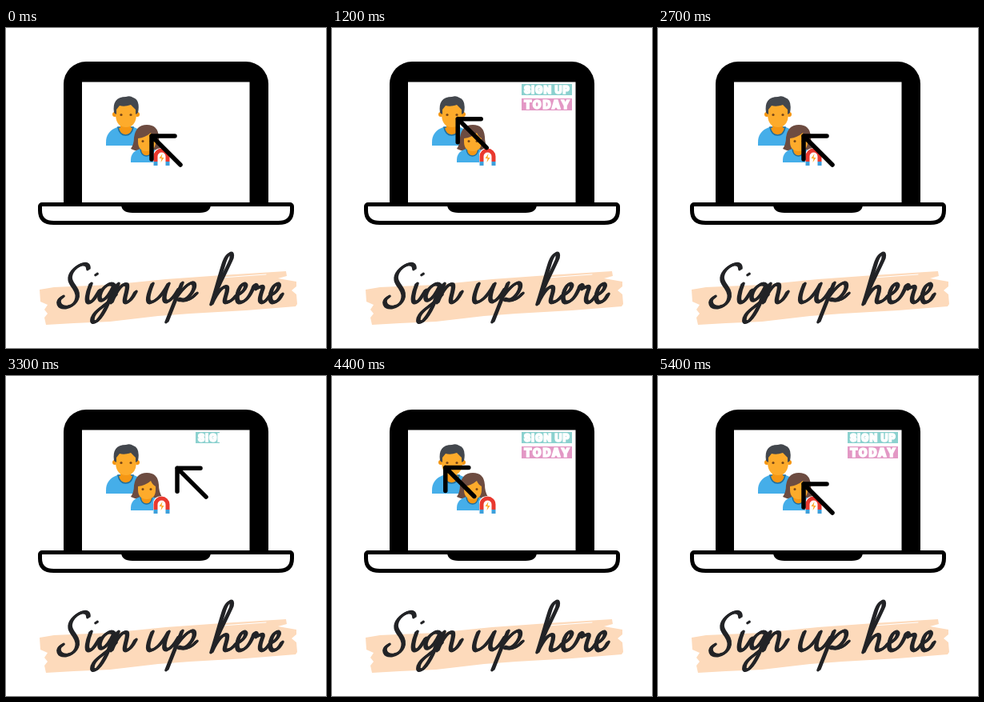
Animation, 400 px wide and 400 px high, one loop 5.5 s. Source, as an HTML page:

```html
<!DOCTYPE html>
<html lang="en">
<head>
<meta charset="utf-8">
<title>Sign up here</title>
<style>
  html, body { margin: 0; width: 100%; height: 100%; overflow: hidden; background: #fff; }
  svg { display: block; }
  #stage { width: 100vw; height: 100vh; }
  .label { font: 900 12.500px Inter, sans-serif; fill: #fff; stroke: #fff; stroke-width: 1.4; }
  .line { fill: none; stroke-linecap: round; stroke-linejoin: round; }
</style>
</head>
<body>
<svg id="stage" viewBox="0 0 400 400">
  <!-- brush stroke -->
  <path fill="#fddabb" d="M42 327 L60 324 130 321 200 314 270 309 350 304 351 310 340 313 363 317 363 323 357 328 363 333 364 345 362 348 300 353 230 357 190 360 130 367 85 369 50 371 48 362 52 357 48 352 52 346 43 342Z"/>
  <path class="line" stroke="#fff" d="M270 312 L325 308"/>

  <!-- lettering -->
  <g class="line" stroke="#222326" stroke-width="3.200" role="img" aria-label="Sign up here">
    <g id="script">
      <path d="M103 301C103 291 91 295 84 303C76 313 82 319 86 325C93 335 88 347 76 349C66 350 62 341 71 336"/>
      <path d="M106 320C102 330 99 343 104 343C109 343 113 334 117 328M113 308h.1"/>
      <path d="M135 322C129 316 119 326 117 335C116 344 125 343 135 322C130 340 122 358 114 366C106 372 105 361 116 352C124 346 130 341 137 334"/>
      <path d="M140 320L132 343C138 328 146 318 151 321C154 325 145 342 150 343C155 343 159 336 162 330"/>
      <path d="M183 320C178 332 175 343 181 343C190 341 198 329 203 320C198 332 195 343 202 342C207 340 212 333 216 326"/>
      <path d="M220 319L201 367M212 338C222 324 232 315 235 320C238 328 224 344 216 339C224 342 232 339 238 332"/>
      <path d="M257 345C264 322 276 303 282 288C284 278 277 281 273 292C268 307 262 330 257 345C264 330 272 321 276 324C279 328 270 342 275 343C280 343 285 338 288 334C296 332 303 322 298 320C291 319 285 342 292 343C299 343 305 335 309 325C311 318 314 322 313 326C316 324 322 321 321 326C318 334 315 343 321 343C325 342 328 337 330 334C338 332 344 322 340 320C332 319 326 342 334 343C340 343 343 337 345 333"/>
    </g>
    <use href="#script" x="1.200" y="-.8"/>
    <use href="#script" x="-1.200" y=".8"/>
  </g>

  <!-- laptop -->
  <path d="M72 220V70a28 28 0 0 1 28-28H300a28 28 0 0 1 28 28V220Z"/>
  <path fill="#fff" d="M95 67.500H304.500V219H95Z"/>
  <path fill="#fff" stroke="#000" stroke-width="5" d="M45 220.500H355a2.500 2.500 0 0 1 2.500 2.500V228q0 15.500-17 15.500H59.500q-17 0-17-15.500V223a2.500 2.500 0 0 1 2.500-2.500Z"/>
  <path d="M144 220H256q0 11-14 11H158q-14 0-14-11Z"/>

  <!-- man -->
  <path fill="#45aee9" d="M125 147v-4q0-14 14-19h21q14 5 14 19v4Z"/>
  <path fill="#f59714" stroke="#1f6f9f" stroke-width="1.500" d="M140 124q2 10 9.500 10t9.500-10Z"/>
  <path fill="#f59714" d="M143 117h13v9q-6 8-13 0Z"/>
  <g fill="#f59714"><circle cx="136" cy="108" r="3"/><circle cx="164" cy="108" r="3"/></g>
  <path fill="#fdab2b" d="M137 97q13-8 26 0v12q-1 15-13 15t-13-15Z"/>
  <path fill="#43474d" d="M135 106q-3-20 15-20 5-2 9 1 9 3 6 19l-3 2v-6l-6-6q-8 3-14 1l-4 5v6Z"/>
  <g fill="#784719"><circle cx="144" cy="108.500" r="1.600"/><circle cx="156" cy="108.500" r="1.600"/></g>

  <!-- woman -->
  <path fill="#6d4c41" d="M156 151q4-6 4-14 2-16 16-16 14 0 15 15 0 9 4 15-7 4-19 4t-20-4Z"/>
  <path fill="#45aee9" d="M156 168v-3q0-11 12-14h15q11 3 11 14v3Z"/>
  <path fill="#f59714" stroke="#1f6f9f" stroke-width="1.500" d="M168 151q1 9 7.500 9t7.500-9Z"/>
  <path fill="#fdab2b" d="M165 138q9-1 16-7 2 5 6 7v4q0 12-11 12t-11-12Z"/>
  <g fill="#784719"><circle cx="171" cy="141.500" r="1.500"/><circle cx="181" cy="141.500" r="1.500"/></g>

  <!-- magnet -->
  <path fill="#fff" d="M184 173V160q0-10 10.500-10t10.500 10v13Z"/>
  <path class="line" style="stroke-linecap:butt" stroke="#e9392f" stroke-width="5" d="M187 167V160.500a7.500 7.500 0 0 1 15 0V167"/>
  <path fill="#3d9fdb" d="M184.500 167h5v5h-5ZM199.500 167h5v5h-5Z"/>
  <path fill="#ffa726" d="M195.500 157l-4 6h3l-1 5 4-6h-3Z"/>

  <!-- banner, each line in its own clipping box -->
  <svg id="line1" x="237" y="70" width="0" height="15">
    <rect width="63" height="14" fill="#8bd1cf"/>
    <text class="label" x="3" y="11.700" style="letter-spacing:1px">SIGN UP</text>
  </svg>
  <svg id="line2" x="237" y="88" width="0" height="16">
    <rect width="63" height="15" fill="#e398c5"/>
    <text class="label" x="3" y="12.500" style="font-size:14px;letter-spacing:1.700px">TODAY</text>
  </svg>

  <path id="arrow" class="line" stroke="#000" stroke-width="5.500" d="M3 32V3H32M3 3L39 39"/>
</svg>
<script>
  const LOOP = 5500, CYCLE = 3070, STEP = 100;
  const BANNER_END = 2400, WIPE_SPEED = 0.143;
  const el = id => document.getElementById(id);
  const clamp = (v, lo, hi) => Math.min(hi, Math.max(lo, v));

  const outCubic = u => 1 - (1 - u) ** 3;
  const outQuad = u => 1 - (1 - u) ** 2;
  const inOut = u => (1 - Math.cos(Math.PI * u)) / 2;

  const rest = [179, 132], right = [218.5, 107.5], left = [127.5, 112];
  const legs = [
    { from: rest, to: right, start: 0, end: 540, ease: outCubic },
    { from: right, to: left, start: 590, end: 1550, ease: inOut },
    { from: left, to: rest, start: 1550, end: 2100, ease: outQuad },
  ];

  function arrowAt(t) {
    const leg = legs.findLast(l => t >= l.start);
    const k = leg.ease(clamp((t - leg.start) / (leg.end - leg.start), 0, 1));
    return leg.from.map((v, i) => v + (leg.to[i] - v) * k);
  }

  function wipe(id, t, start) {
    const width = t < BANNER_END ? clamp((t - start) * WIPE_SPEED, 0, 63) : 0;
    el(id).setAttribute("width", width);
  }

  function draw(now) {
    const t = Math.floor(now % LOOP / STEP) * STEP % CYCLE;
    el("arrow").setAttribute("transform", `translate(${arrowAt(t)})`);
    wipe("line1", t, 20);
    wipe("line2", t, 400);
  }

  let began;
  function frame(now) {
    began ??= now;
    draw(now - began);
    requestAnimationFrame(frame);
  }
  draw(0);
  requestAnimationFrame(frame);
</script>
</body>
</html>
```
